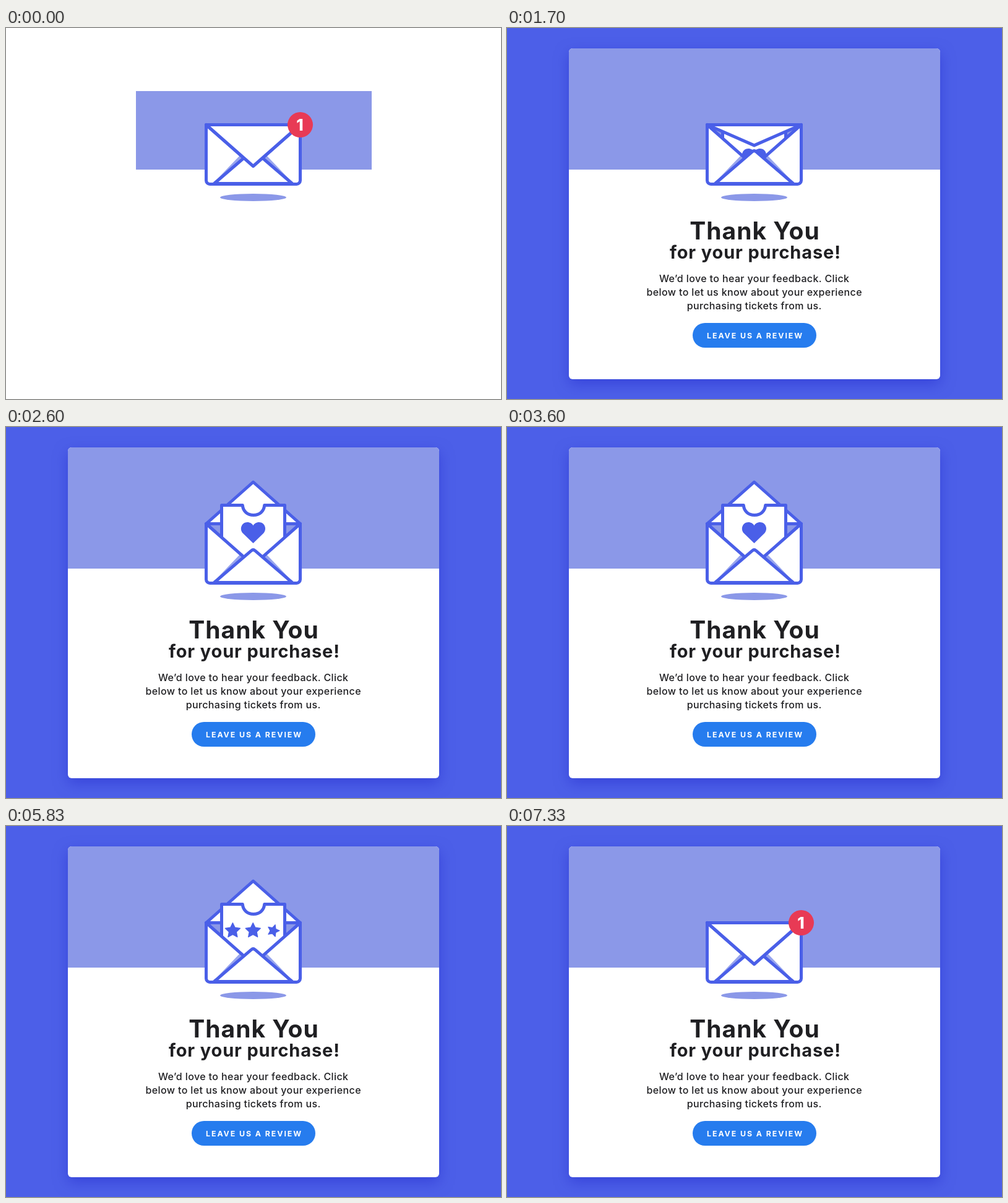
An HTML page that plays this animation: 800 px wide and 600 px high, repeating every 7450 ms.

```html
<!DOCTYPE html>
<html lang="en">
<head>
<meta charset="utf-8">
<title>Thank you</title>
<style>
  html, body { margin: 0; width: 100%; height: 100%; overflow: hidden; background: #fff; }
  svg { display: block; width: 800px; height: 600px; }
  text { font-family: Inter, "Open Sans", sans-serif; text-anchor: middle; fill: #1f1f22; }
  .card { fill: #fff; filter: drop-shadow(0 8px 11px rgba(38, 48, 205, .55)); }
  .title { font-size: 39px; font-weight: 700; letter-spacing: 1px; }
  .sub { font-size: 29px; font-weight: 700; letter-spacing: .85px; }
  .copy { font-size: 16px; font-weight: 500; letter-spacing: .38px; }
  .cta { font-size: 12.4px; font-weight: 700; letter-spacing: 1.9px; fill: #fff; }
  .one { font-size: 26px; font-weight: 800; fill: #fff; }
  .tint { fill: #8b98e8; }
  .shade { fill: #98a5ee; }
  .ink { fill: #4a5fe8; }
  .line { fill: #fff; stroke: #4a5fe8; stroke-width: 5; stroke-linejoin: round; stroke-linecap: round; }
  .open { fill: none; }
  .star { stroke: #4a5fe8; stroke-width: 1.4; stroke-linejoin: round; }
</style>
</head>
<body>
<svg viewBox="0 0 800 600">
  <defs>
    <clipPath id="pocket"><rect x="320" y="60" width="160" height="186"/></clipPath>
  </defs>

  <rect id="intro" class="tint" x="210" y="102" width="381" height="127"/>

  <g id="page">
    <rect width="800" height="600" fill="#4c5fe8"/>
    <rect class="card" x="100" y="33" width="600" height="535" rx="6"/>
    <path class="tint" d="M100 229V39a6 6 0 0 1 6-6H694a6 6 0 0 1 6 6V229Z"/>
    <text class="title" x="400.5" y="342">Thank You</text>
    <text class="sub" x="401.4" y="373">for your purchase!</text>
    <text class="copy" x="399.7" y="411">We’d love to hear your feedback. Click</text>
    <text class="copy" x="399.7" y="433">below to let us know about your experience</text>
    <text class="copy" x="399.7" y="455">purchasing tickets from us.</text>
    <rect x="300" y="477" width="200" height="40" rx="20" fill="#267cee"/>
    <text class="cta" x="401" y="501.7">LEAVE US A REVIEW</text>
  </g>

  <ellipse class="tint" cx="399.5" cy="274" rx="53.5" ry="6"/>

  <path class="tint" d="M323.5 156.5H475.5V240H323.5Z"/>
  <path id="lidBack" class="line"/>
  <g clip-path="url(#pocket)">
    <g id="ticket">
      <path class="line" d="M348.5 260V126.5H382.3C383 136 390 142.5 400 142.5S417 136 417.7 126.5H450.5V260Z"/>
      <path id="heart" class="ink"
        d="M0 17L-16.5 1C-23-6-18.5-17-9.5-17C-5-17-1.5-14.6 0-11.5C1.5-14.6 5-17 9.5-17C18.5-17 23-6 16.5 1Z"/>
      <g id="stars"></g>
    </g>
  </g>

  <path fill="#fff" d="M323.5 156.5L399.5 223.5L475.5 156.5V252.5H323.5Z"/>
  <path class="shade" d="M334 252L380 204L388 211ZM465 252L419 204L411 211Z"/>
  <path class="line open" d="M323.5 156.5L384 209.8M475.5 156.5L415 209.8"/>
  <path class="line" d="M336.5 251.5L396.3 200.2Q399.5 197.2 402.7 200.2L462.5 251.5Z"/>
  <path class="line open" d="M323.5 156.5V246.5a6 6 0 0 0 6 6H469.5a6 6 0 0 0 6-6V156.5"/>
  <path id="lidFront" class="line"/>

  <g id="badge">
    <circle r="20.5" fill="#e83a55"/>
    <text class="one" x="-.5" y="9.6">1</text>
  </g>
</svg>
<script>
const LOOP = 7450;
const $ = id => document.getElementById(id);
const show = (el, on) => el.setAttribute('visibility', on ? 'visible' : 'hidden');

// Each track holds runs of [start, step length, values]; the last value of a run stays.
const SHRINK = [.8, .6, .4, .2, 0];
const GROW = [.2, .4, .6, .8, 1];
const ease = n => Array.from({ length: n }, (_, i) => (1 - Math.cos(Math.PI * (i + 1) / n)) / 2);

const tracks = {
  badge: [[0, 50, [1]], [1050, 50, [1.02, 1.05, 1.08, 1.1, 1.06, ...SHRINK]], [7210, 30, GROW]],
  lid: [[0, 50, [0]], [1550, 50, ease(12)], [7000, 30, ease(7).map(v => 1 - v)]],
  ticket: [[0, 50, [41]], [2250, 50, [41, 36, 24, 8, -4, -10, -5, 0]],
           [6700, 30, [2, 7, 15, 24, 32, 38, 41]]],
  heart: [[0, 50, [1]], [3600, 30, [1, 1.1, 1.22, 1.28, 1.2, .9, .6, .3, 0]]],
};
const starTimes = [[3960, 6430], [4260, 6130], [4560, 5830]];
const starTracks = starTimes.map(([on, off]) => [[0, 30, [0]], [on, 30, GROW], [off, 30, SHRINK]]);

function valueAt(track, t) {
  const [start, dt, vals] = track.findLast(run => t >= run[0]);
  return vals[Math.min(vals.length - 1, Math.floor((t - start) / dt))];
}

const starPath = 'M' + Array.from({ length: 10 }, (_, i) => {
  const r = i % 2 ? 6.2 : 12.6, a = Math.PI * (i / 5 - .5);
  return `${r * Math.cos(a)} ${r * Math.sin(a)}`;
}).join('L') + 'Z';

const stars = starTimes.map(() => {
  const el = document.createElementNS('http://www.w3.org/2000/svg', 'path');
  el.setAttribute('d', starPath);
  el.setAttribute('class', 'ink star');
  return $('stars').appendChild(el);
});

function place(el, x, y, size, turn = 0) {
  show(el, size > 0);
  el.setAttribute('transform', `translate(${x} ${y}) rotate(${turn}) scale(${size})`);
}

function draw(t) {
  show($('intro'), t < 1000);
  show($('page'), t >= 1000);

  const lid = valueAt(tracks.lid, t);
  const tip = 223.5 - 134.5 * lid;
  const isOpen = tip < 156.5;
  for (const id of ['lidBack', 'lidFront']) {
    $(id).setAttribute('d', `M323.5 156.5H475.5L399.5 ${tip}Z`);
    show($(id), isOpen === (id === 'lidBack'));
  }

  $('ticket').setAttribute('transform', `translate(0 ${valueAt(tracks.ticket, t)})`);
  place($('heart'), 399.5, 171, valueAt(tracks.heart, t));
  stars.forEach((el, i) => {
    const size = valueAt(starTracks[i], t);
    place(el, 366.4 + 32.8 * i, 169.3, size, 90 * (1 - size));
  });
  place($('badge'), 475.5, 156.5, valueAt(tracks.badge, t));
}

const begin = performance.now();
function tick() {
  draw((performance.now() - begin) % LOOP);
  requestAnimationFrame(tick);
}
tick();
</script>
</body>
</html>
```
